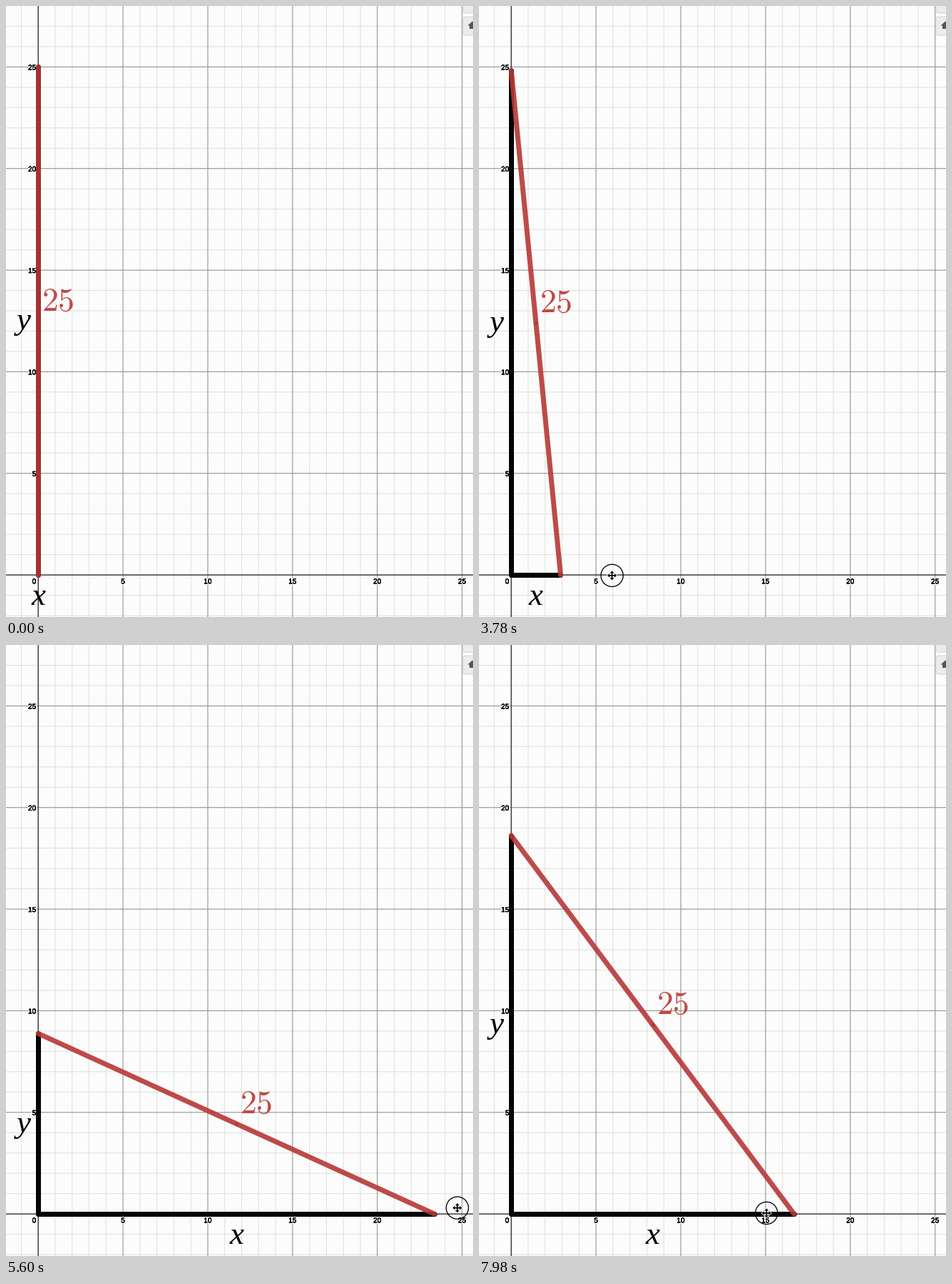
Write a matplotlib script that moves like this. It is 655 px wide and 856 px high and loops after 8000 ms.

```python
import numpy as np
import matplotlib.pyplot as plt
from matplotlib.animation import FuncAnimation
from matplotlib.collections import LineCollection
from matplotlib.patches import Circle, FancyBboxPatch, Polygon
from matplotlib.patheffects import withStroke

W, H, DPI = 655, 856, 100
STEP, LOOP = 40, 8000
X0, Y0 = 45.2, 797.1          # graph origin in pixels
SX, SY = 23.78, 28.47         # pixels per unit
LENGTH = 25
PAPER, RED, BLACK = "#fcfcfc", "#b73835", "#040404"

plt.rcParams["mathtext.fontset"] = "cm"
fig = plt.figure(figsize=(W / DPI, H / DPI), dpi=DPI, facecolor=PAPER)
ax = fig.add_axes([0, 0, 1, 1])
ax.set(xlim=(0, W), ylim=(H, 0))
ax.axis("off")


def pt(px):
    return px * 72 / DPI


def to_px(x, y):
    return X0 + SX * x, Y0 - SY * y


# --- graph paper -----------------------------------------------------------
def rules(steps, color, width, z):
    lines = [[(X0 + SX * k, 0), (X0 + SX * k, H)] for k in steps]
    lines += [[(0, Y0 - SY * k), (W, Y0 - SY * k)] for k in steps]
    ax.add_collection(LineCollection(lines, colors=color, linewidths=pt(width),
                                     snap=False, zorder=z))


rules([k for k in range(-2, 28) if k % 5], "#dfe0da", 1, 1)
rules(range(5, 26, 5), "#92928f", 1.1, 1.1)
rules([0], "#33332c", 1.4, 1.2)

crisp = [withStroke(linewidth=pt(3), foreground=PAPER),
         withStroke(linewidth=pt(0.4), foreground="black")]


def tick(x, y, text, ha):
    ax.text(x, y, text, ha=ha, va="center_baseline", fontsize=pt(10),
            family="Liberation Sans", color="black", path_effects=crisp,
            zorder=2)


for n in range(0, 26, 5):
    x, y = to_px(n, n)
    if n:
        tick(x, 805.3, str(n), "center")
    tick(42.3, y if n else 805.3, str(n), "right")

# --- toolbar edge ----------------------------------------------------------
for top, bottom in ((-20, 10), (15, 41)):
    ax.add_patch(FancyBboxPatch((641, top), 40, bottom - top,
                                boxstyle="round,pad=0,rounding_size=4",
                                fc="#ececec", ec="#d4d4d4", lw=pt(1), zorder=3))
ax.add_patch(Polygon([(647.5, 27.5), (654, 21.5), (661, 27.5), (659, 27.5),
                      (659, 32), (650, 32), (650, 27.5)],
                     fc="#555555", ec="none", zorder=3.1))


# --- triangle --------------------------------------------------------------
def bar(color, z, alpha=1):
    return ax.plot([], [], color=color, lw=pt(7), alpha=alpha,
                   solid_capstyle="round", zorder=z)[0]


def letter(s):
    return ax.text(0, 0, s, ha="center", va="baseline", fontsize=pt(45),
                   family="Liberation Serif", style="italic", color="black",
                   zorder=6)


wall, ground = bar(BLACK, 4), bar(BLACK, 4)
ladder = bar(RED, 5, 0.9)
middle = ax.plot([], [], "o", ms=pt(5), mew=0, color="#a8302d", alpha=0.6,
                 zorder=5.1)[0]
x_name, y_name = letter("x"), letter("y")
size = ax.text(0, 0, "$25$", ha="left", va="baseline", fontsize=pt(46),
               color="#c04a46", zorder=6)

# --- pointer ---------------------------------------------------------------
ARROW = np.array([(0, 0), (0, 12), (2.7, 9.6), (4.7, 14.2), (6.8, 13.3),
                  (4.9, 8.8), (8.6, 8.6)])
ARM = np.array([(0.9, 0.9), (0.9, 3.4), (2.9, 3.4), (0, 6.6), (-2.9, 3.4),
                (-0.9, 3.4)])
TURN = np.array([(0, 1), (-1, 0)])
MOVE = np.vstack([ARM @ np.linalg.matrix_power(TURN, k) for k in range(4)])


def shape(points):
    edge = [withStroke(linewidth=pt(1.6), foreground="white")]
    return ax.add_patch(Polygon(points, fc="#080808", ec="none",
                                path_effects=edge, zorder=9))


arrow, move = shape(ARROW), shape(MOVE)
ring = ax.add_patch(Circle((0, 0), 15.6, fill=False, ec="black", lw=pt(1.3),
                           zorder=8))

# --- motion ----------------------------------------------------------------
ENTER, PRESS, LAG = 560, 2660, 200
START = (60, 866)
# start and end time of each pointer move, and where it leads
MOVES = [(560, 1280, 47, 804.5), (1520, 2100, X0, 798), (3180, 4880, 540, 797.5),
         (4900, 5900, 655, 786.5), (7000, 8050, 400, 796)]


def ease(u):
    u = np.clip(u, 0, 1)
    return u * u * (3 - 2 * u)


def pointer(t):
    pos = np.array(START, float)
    for begin, end, *goal in MOVES:
        pos += (np.array(goal) - pos) * ease((t - begin) / (end - begin))
    return pos


def foot(t):
    """The ladder's foot trails the pointer and stops at full length."""
    trail = pointer(max(t - LAG, PRESS))[0]
    return np.clip((trail - X0) / SX, 0, LENGTH)


def draw(frame):
    t = frame * STEP + STEP / 2
    x = foot(t)
    y = np.sqrt(LENGTH ** 2 - x * x)
    (fx, fy), (tx, ty) = to_px(x, 0), to_px(0, y)
    mx, my = to_px(x / 2, y / 2)

    wall.set_data([X0, X0], [Y0, ty])
    ground.set_data([X0, fx], [Y0, Y0])
    ladder.set_data([tx, fx], [ty, fy])
    middle.set_data([mx], [my])
    x_name.set_position((mx, 839))
    y_name.set_position((24.5, my + 12))
    size.set_position((mx + 5.3, my - 14.8))

    mouse = pointer(t)
    arrow.set_xy(ARROW + mouse)
    move.set_xy(MOVE + mouse)
    ring.set_center(mouse)
    arrow.set_visible(ENTER <= t < PRESS)
    move.set_visible(t >= PRESS)
    ring.set_visible(t >= PRESS)
    ring.set_alpha(float(np.clip((t - PRESS) / 200, 0, 1)))
    return (wall, ground, ladder, middle, x_name, y_name, size, ring, arrow,
            move)


anim = FuncAnimation(fig, draw, frames=LOOP // STEP, interval=STEP, blit=True,
                     repeat=True, repeat_delay=0)
plt.show()
```
